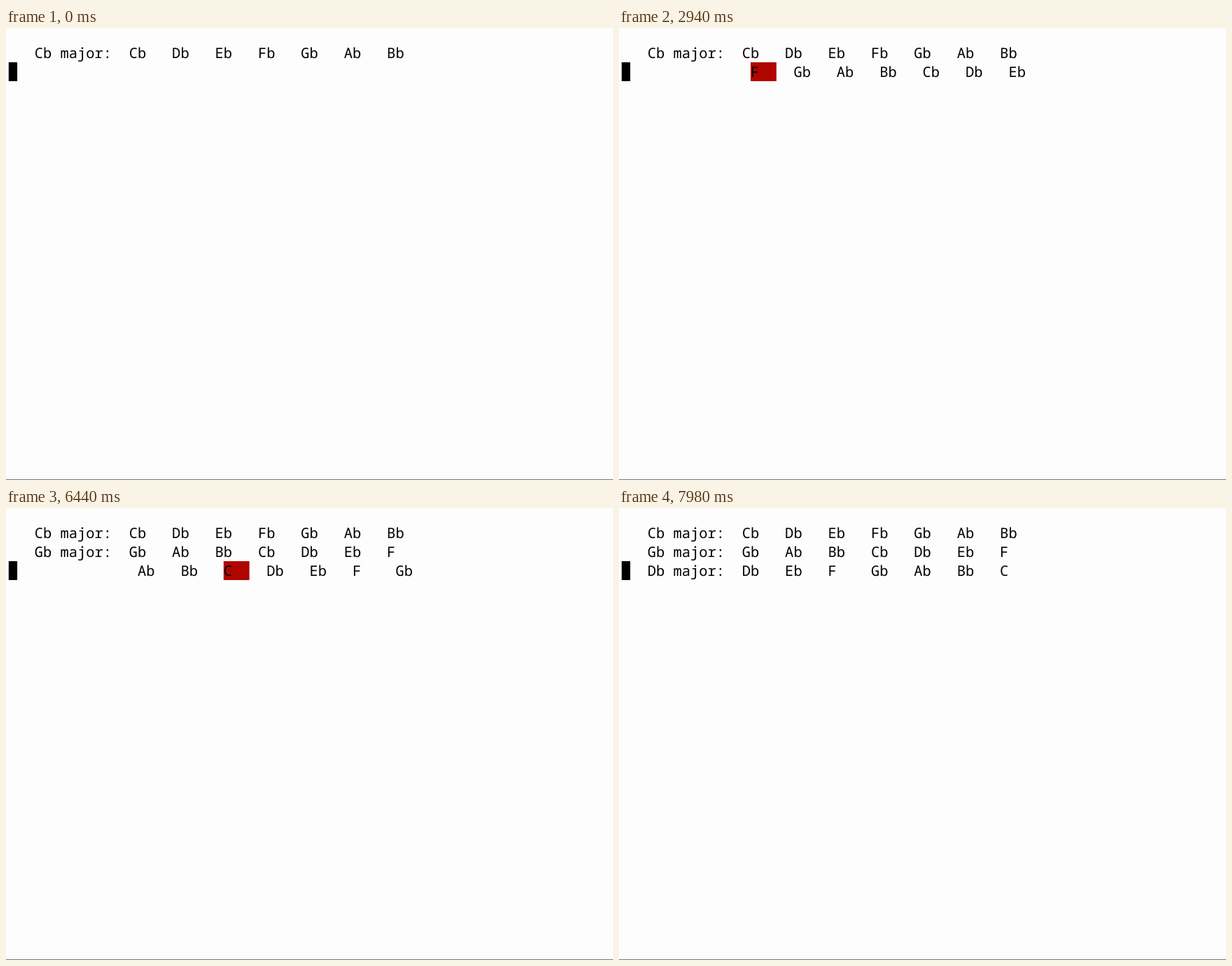
Write an HTML page that moves like this. It is 867 px wide and 646 px high and loops after 8000 ms.

```html
<!DOCTYPE html>
<html lang="en">
<head>
<meta charset="utf-8">
<title>Circle of fifths</title>
<style>
  html, body { margin: 0; width: 100%; height: 100%; overflow: hidden; background: #fdfdfd; }
  svg { display: block; width: 867px; height: 646px; }
  text {
    font: 20.47px "Noto Sans Mono", "DejaVu Sans Mono", monospace;
    fill: #000;
    white-space: pre;
    text-rendering: geometricPrecision;
  }
</style>
</head>
<body>
<svg viewBox="0 0 867 646">
  <rect width="867" height="646" fill="#fdfdfd"/>
  <rect y="645" width="867" height="1" fill="#77728a"/>
  <g id="screen"></g>
</svg>
<script>
const LOOP = 8000;
const CELL = 12.28, LINE = 27, LEFT = 3.8, TOP = 22;
const FIRST = 14, GAP = 5;           // first note column, columns per note
const CYCLE = 89;                    // ticks spent on one scale
const COPY = 14, MARK = 29, SLIDE = 42.8, RATE = 0.7, NEXT = 88;
const DONE = 4 * GAP + 1;            // four rotations, then the label

const screen = document.getElementById('screen');
const colX = col => LEFT + col * CELL;
const rowY = row => TOP + row * LINE;

const text = (col, row, s) =>
  `<text x="${colX(col).toFixed(2)}" y="${rowY(row) + 21}">${s}</text>`;
const block = (col, row, cells, fill) =>
  `<rect x="${colX(col).toFixed(2)}" y="${rowY(row)}" width="${(cells * CELL).toFixed(2)}" height="${LINE}" fill="${fill}"/>`;

const rotate = (notes, n) => [...notes.slice(n), ...notes.slice(0, n)];
const raiseFourth = notes => notes.map((n, i) => i === 3 ? n[0] : n);
const nextScale = notes => rotate(raiseFourth(notes), 4);

function drawNotes(notes, row, shift = 0, marked = '') {
  return notes.map((n, i) => {
    const col = FIRST + i * GAP + shift;
    return (n === marked ? block(col, row, 3, '#b00600') : '') + text(col, row, n);
  }).join('');
}

const drawScale = (notes, row) =>
  text(3, row, notes[0] + ' major:') + drawNotes(notes, row);

// Derive a scale from the one above it: copy, raise the fourth, rotate, label.
function drawDerived(prev, row, u) {
  if (u < COPY) return '';
  if (u < MARK) return drawNotes(prev, row);
  const pos = Math.max(0, Math.floor(RATE * (u - SLIDE)));
  if (pos >= DONE) return drawScale(nextScale(prev), row);
  const turns = Math.ceil(pos / GAP);
  const raised = raiseFourth(prev);
  return drawNotes(rotate(raised, turns), row, turns * GAP - pos, raised[3]);
}

// Uneven ticks: 20, 100 and 20 ms, repeating.
function tickAt(t) {
  const r = t % 140;
  return 3 * Math.floor(t / 140) + (r < 20 ? 0 : r < 120 ? 1 : 2);
}

function render(tick) {
  let scale = ['Cb', 'Db', 'Eb', 'Fb', 'Gb', 'Ab', 'Bb'];
  let out = drawScale(scale, 0), cursor = 1;
  for (let row = 1; row <= 2; row++) {
    const u = tick - (row - 1) * CYCLE;
    out += drawDerived(scale, row, u);
    if (u >= NEXT) cursor = row + 1;
    scale = nextScale(scale);
  }
  screen.innerHTML = out + block(0, cursor, 1, '#000');
}

let start, shown = -1;
function loop(now) {
  start ??= now;
  const tick = tickAt((now - start) % LOOP);
  if (tick !== shown) render(shown = tick);
  requestAnimationFrame(loop);
}
render(0);
requestAnimationFrame(loop);
</script>
</body>
</html>
```
